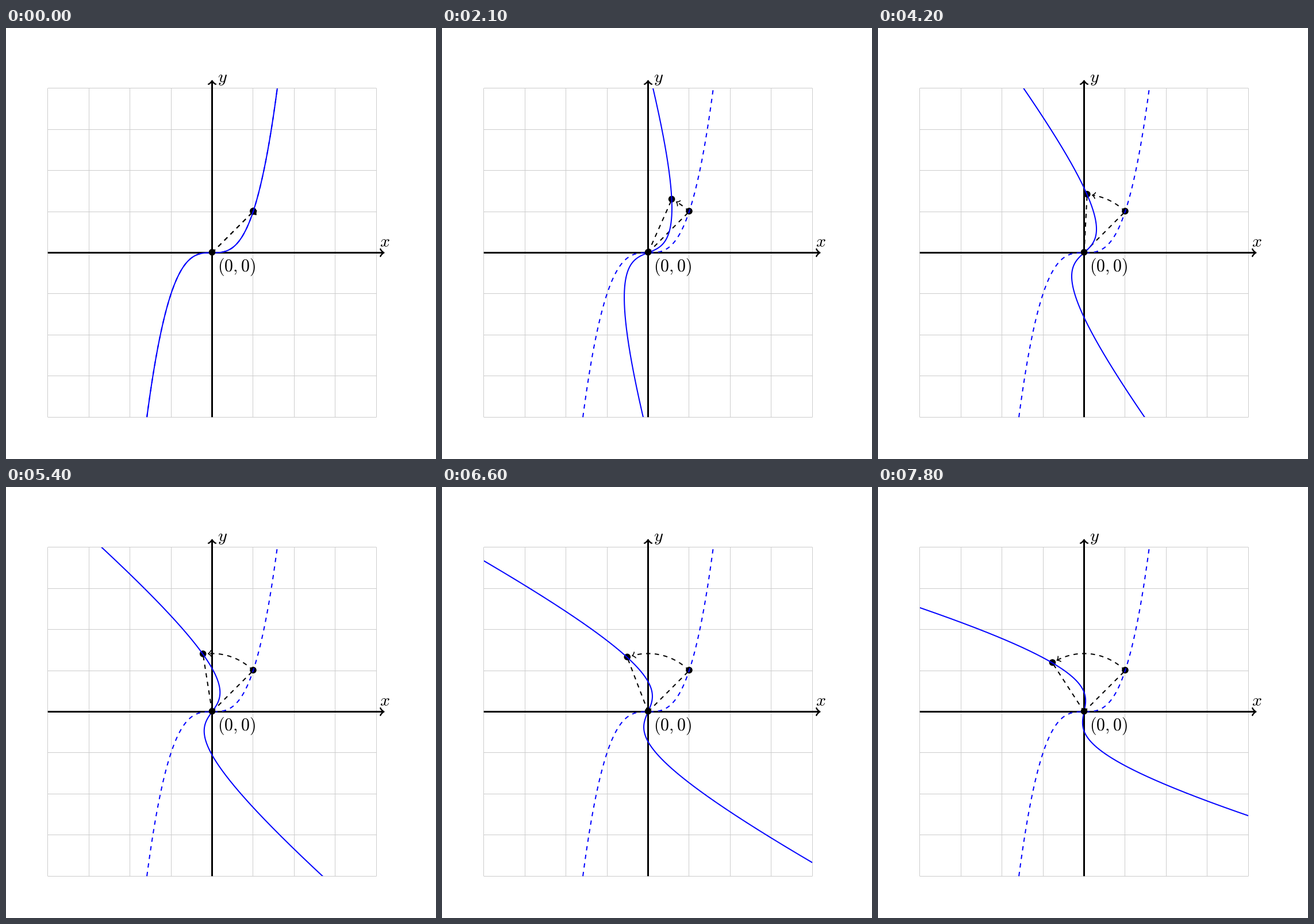
A matplotlib script that plays this animation: 748 px wide and 749 px high, repeating every 8000 ms.

```python
import numpy as np
import matplotlib.pyplot as plt
from matplotlib.animation import FuncAnimation
from matplotlib.patches import Circle, PathPatch, Rectangle
from matplotlib.path import Path

WIDTH, HEIGHT, DPI = 748, 749, 64
UNIT = 71.45                    # pixels per grid unit
CX, CY = 358.5, 390.5           # origin on the stage
TEX_PT = 2.51                   # pixels per drawing point
PX = 72 / DPI                   # matplotlib points per pixel
THICK, VERY_THICK = 0.8, 1.2    # stroke widths in drawing points
RADIUS, START = np.sqrt(2), np.pi / 4
TIP_GAP = 8.3 / UNIT
DOT_SHIFT = np.array([0, 0.8 / UNIT])

INTERVAL, FRAMES = 100, 80
FRAMES_PER_STEP, STEP_ANGLE = 3, np.radians(3)

plt.rcParams["mathtext.fontset"] = "cm"
fig = plt.figure(figsize=(WIDTH / DPI, HEIGHT / DPI), dpi=DPI, facecolor="white")
ax = fig.add_axes([0, 0, 1, 1])
ax.set_xlim(-CX / UNIT, (WIDTH - CX) / UNIT)
ax.set_ylim((CY - HEIGHT) / UNIT, CY / UNIT)
ax.axis("off")


def polar(angle, radius=RADIUS):
    return radius * np.array([np.cos(angle), np.sin(angle)])


def rotate(points, angle):
    c, s = np.cos(angle), np.sin(angle)
    return np.array([[c, -s], [s, c]]) @ points


def stroke(x, y, color="black", width=THICK, dashed=False, z=3):
    style = (0, (3 / THICK, 3 / THICK)) if dashed else "-"
    return ax.plot(x, y, color=color, lw=width * TEX_PT * PX, ls=style,
                   solid_capstyle="butt", dash_capstyle="butt",
                   snap=False, zorder=z)[0]


def head_reach(width):
    """Distance from the end of the shaft to the outer tip."""
    return (0.21 + 0.625 * width) * TEX_PT / UNIT


def head_path(tip, direction, width):
    a = (0.28 + 0.3 * width) * TEX_PT / UNIT
    points = a * np.array([(-3, 4), (-2.75, 2.5), (0, 0.25), (0.75, 0),
                           (0, -0.25), (-2.75, -2.5), (-3, -4)]).T
    base = tip - polar(direction, head_reach(width))
    return Path(rotate(points, direction).T + base,
                [Path.MOVETO] + [Path.CURVE4] * 6)


def add_head(tip, direction, width, z=3):
    return ax.add_patch(PathPatch(
        head_path(tip, direction, width), fill=False, ec="black",
        lw=0.8 * width * TEX_PT * PX, capstyle="round", joinstyle="round",
        snap=False, zorder=z))


def add_dot(center, z=5):
    return ax.add_patch(Circle(center + DOT_SHIFT, 5.8 / UNIT,
                               fc="black", ec="none", zorder=z))


def label(x, y, text):
    ax.text((x - CX) / UNIT, (CY - y) / UNIT, text, fontsize=30.1 * PX,
            ha="center", va="baseline", zorder=8)


# Grid lines sit on whole pixels
for k in range(-4, 5):
    gx = (np.floor(CX + k * UNIT) + 0.5 - CX) / UNIT
    gy = (CY - np.floor(CY - k * UNIT) - 0.5) / UNIT
    stroke([gx, gx], [-4, 4], "#cccccc", 1 / TEX_PT, z=1)
    stroke([-4, 4], [gy, gy], "#cccccc", 1 / TEX_PT, z=1)

AXIS_END = 4.2
shaft_end = AXIS_END - head_reach(VERY_THICK)
stroke([-4, shaft_end], [0, 0], width=VERY_THICK, z=2)
stroke([0, 0], [-4, shaft_end], width=VERY_THICK, z=2)
add_head(np.array([AXIS_END, 0]), 0, VERY_THICK)
add_head(np.array([0, AXIS_END]), np.pi / 2, VERY_THICK)

label(658.5, 380, "$x$")
label(376.7, 94, "$y$")
label(401.5, 423, "$(0,0)$")

# Cubic, its fixed dashed copy and the rotating one
edge = 4 ** (1 / 3)
t = np.linspace(-edge, edge, 500)
stroke(t, t ** 3, "blue", dashed=True, z=6)
t = np.linspace(-2.2, 2.2, 900)
cubic = np.array([t, t ** 3])
curve = stroke([], [], "blue", z=6)
curve.set_clip_path(Rectangle((-4, -4), 8, 8, transform=ax.transData))

start_point = polar(START)
stroke([0, start_point[0]], [0, start_point[1]], dashed=True)
spoke = stroke([], [], dashed=True)
arc = stroke([], [], dashed=True)
arrow = add_head(start_point, 0, THICK)
add_dot(start_point)
moving_dot = add_dot(start_point)
add_dot(np.zeros(2), z=7)


def update(frame):
    turn = frame // FRAMES_PER_STEP * STEP_ANGLE
    angle = START + turn
    point = polar(angle)
    curve.set_data(*rotate(cubic, turn))
    spoke.set_data([0, point[0]], [0, point[1]])
    moving_dot.center = tuple(point + DOT_SHIFT)

    tip_angle = angle - TIP_GAP / RADIUS
    arc_end = max(START, tip_angle - head_reach(THICK) / RADIUS)
    arc.set_data(*polar(np.linspace(START, arc_end, 60)))
    # An arc shorter than the gap turns its head backwards
    side = 1 if tip_angle > START else -1
    arrow.set_path(head_path(polar(tip_angle), tip_angle + side * np.pi / 2, THICK))
    return curve, spoke, moving_dot, arc, arrow


anim = FuncAnimation(fig, update, frames=FRAMES, interval=INTERVAL,
                     repeat=True, repeat_delay=0, blit=False)
plt.show()
```
